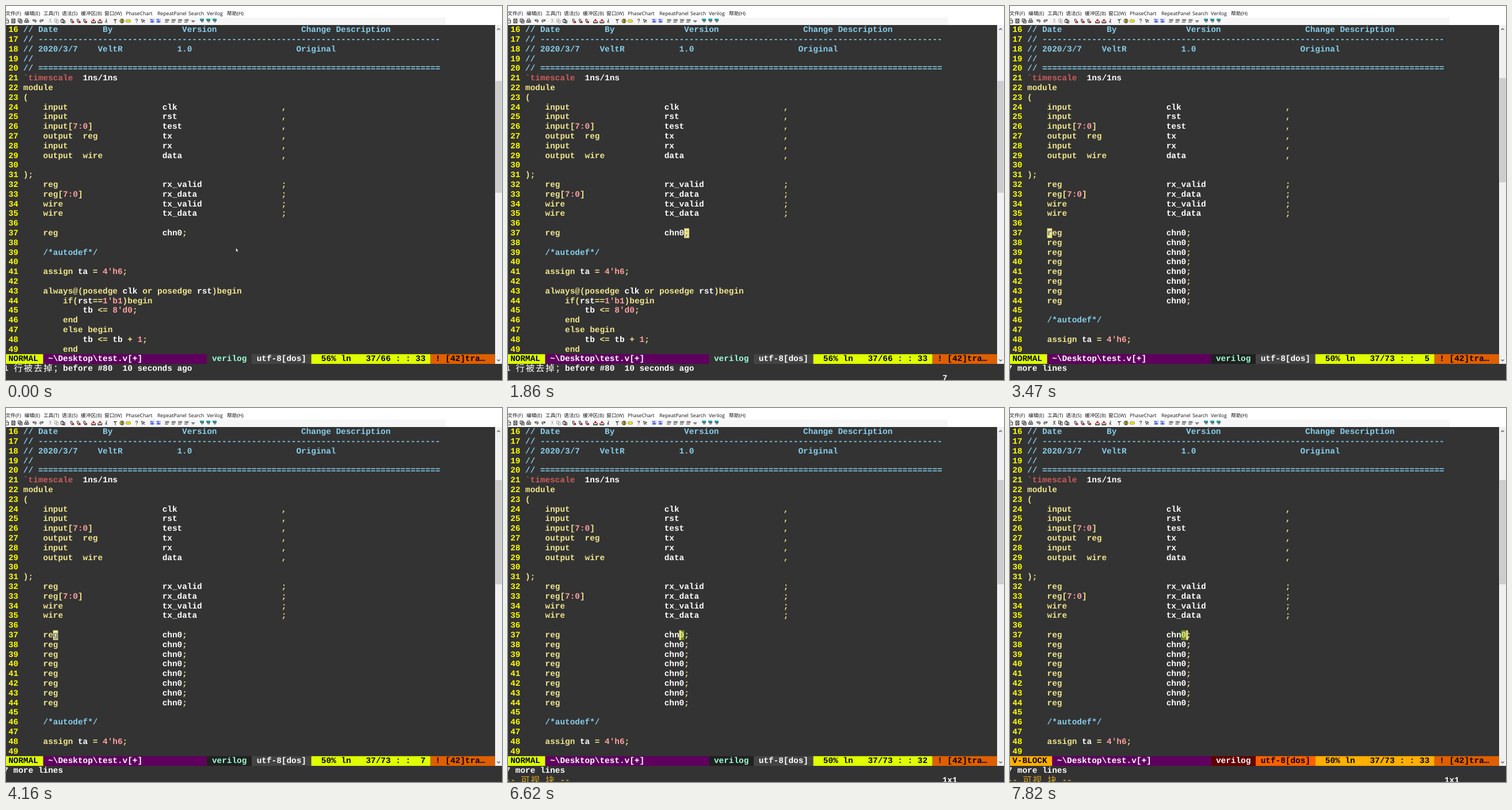
Write an HTML page that moves like this. It is 862 px wide and 649 px high and loops after 8 s.

```html
<!DOCTYPE html>
<html lang="zh-CN">
<head>
<meta charset="utf-8">
<title>Verilog editor</title>
<style>
html, body { margin: 0; width: 100%; height: 100%; overflow: hidden; background: #333; }
svg { display: block; }
text { white-space: pre; text-rendering: geometricPrecision; }
.code { font: bold 14.38px "Liberation Mono", monospace; }
.han { font: 15.5px "Noto Sans CJK SC", "Noto Sans CJK", sans-serif; }
.menu { font: 8.7px "Open Sans", "Noto Sans CJK SC", "Noto Sans CJK", sans-serif; }
.icon { fill: none; stroke-width: 1; }
</style>
</head>
<body>
<svg id="stage" width="862" height="649" viewBox="0 0 862 649"></svg>
<script>
const stage = document.getElementById('stage');
const sheet = document.styleSheets[0];
const W = 8.63, H = 16.8, LOOP = 8000;
const X = col => -4.5 + col * W;
const Y = row => 33 + row * H;
const C = {
  bg: '#333333', text: '#ffffff', comment: '#87ceeb', keyword: '#f0e68c',
  number: '#ffa0a0', macro: '#cd5c5c', line: '#ffff00', slate: '#708090',
  select: '#6b8e23', mode: '#daa520'
};

function add(tag, attrs, parent = stage, text) {
  const el = document.createElementNS('http://www.w3.org/2000/svg', tag);
  for (const key in attrs) el.setAttribute(key, attrs[key]);
  if (text !== undefined) el.textContent = text;
  return parent.appendChild(el);
}
const group = () => add('g', {});
const rect = (x, y, width, height, fill, parent) =>
  add('rect', { x, y, width, height, fill }, parent);
const cells = (col, row, n, fill, parent) => rect(X(col), Y(row), n * W, H, fill, parent);
const put = (col, row, str, fill, parent) =>
  add('text', { class: 'code', x: X(col), y: Y(row) + 12.2, fill }, parent, str);
const han = (col, row, str, fill, parent) =>
  add('text', {
    class: 'han', x: [...str].map((_, i) => X(col + 2 * i) + .8).join(' '),
    y: Y(row) + 13.4, fill
  }, parent, str);

// Visible from the first time, hidden at the second, and so on (ms).
let count = 0;
function show(el, ...times) {
  const name = 'show' + count++;
  const steps = times.map((t, i) => `${t / LOOP * 100}% { opacity: ${1 - i % 2} }`);
  if (times[0] > 0) steps.unshift('0% { opacity: 0 }');
  sheet.insertRule(`@keyframes ${name} { ${steps.join(' ')} }`, sheet.cssRules.length);
  el.style.animation = `${name} ${LOOP}ms step-end infinite`;
  return el;
}

// Verilog highlighting
const TOKEN = /\/\/.*|\/\*.*?\*\/|`\w+|\d+ns\/\d+ns|\d+'[hbd]\w+|\d+(:\d+)?|[a-z]\w*|[^\s\w]+/g;
const KEYWORD = /^(module|input|output|reg|wire|assign|always|posedge|or|if|else|begin|end)$/;
function colour(token) {
  if (/^\/[*/]/.test(token)) return C.comment;
  if (token[0] === '`') return C.macro;
  if (/ns$/.test(token)) return C.text;
  if (/^\d/.test(token)) return C.number;
  return KEYWORD.test(token) || /^\W/.test(token) ? C.keyword : C.text;
}
function code(lines, row, parent) {
  lines.forEach((line, i) => {
    for (const m of line.matchAll(TOKEN)) put(4 + m.index, row + i, m[0], colour(m[0]), parent);
  });
}
const at = (...parts) => {
  let s = '';
  for (let i = 0; i < parts.length; i += 2) s = s.padEnd(parts[i]) + parts[i + 1];
  return s;
};
const SLASHES = '/'.repeat(2);
const note = (...parts) => at(0, SLASHES, ...parts);
const decl = (type, name, end) => at(4, type, 28, name, 52, end);
const chn = '    reg'.padEnd(28) + 'chn0;';

// Menu and tool bar
rect(0, 0, 862, 33, '#ffffff');
rect(0, 20, 764, 13, '#f6f6f6');
[[-1, '文件(F)'], [32, '编辑(E)'], [65, '工具(T)'], [97, '语法(S)'], [130, '缓冲区(B)'],
 [171, '窗口(W)'], [208, 'PhaseChart'], [263, 'RepeatPanel'], [317, 'Search'],
 [349, 'Verilog'], [384, '帮助(H)']]
  .forEach(([x, s]) => add('text', { class: 'menu', x, y: 15.5, fill: '#111' }, stage, s));

const SHAPE = {
  page: 'M1.5 .5h3l2 2v5h-5zM2 3.5h4',
  disk: 'M.5 .5h6v7h-6zM2 .5v3h3v-3M2 7v-2h3v2',
  disks: 'M.5 .5h5v5h-5zM2.5 2.5h5v5h-5zM4 5h2',
  print: 'M.5 3.5h7v3h-7zM2 3V.5h4V3M2 5h4',
  undo: 'M1.5 4a2.5 2.5 0 1 1 2.5 2.5M1 1v3h3M3 4h3',
  redo: 'M6.5 4A2.5 2.5 0 1 0 4 6.5M7 1v3H4M2 4h3',
  cut: 'M2.5 0l2 5M5.5 0l-2 5M1.5 6h2M4.5 6h2',
  copy: 'M.5 .5h4v5h-4zM3 2.5h4v5H3z',
  paste: 'M.5 1.5h5v5h-5zM2 .5h2M3.5 3.5h4v4h-4z',
  find: 'M1 1h3v2l3 3v1H3zM1 4l3 3',
  load: 'M.5 4v3.5h7V4M1 6h6',
  run: 'M3 .5a1.5 1.5 0 1 1 0 3l2 4M2 7l2-4',
  tool: 'M1 1.5h6M4 1v7M3 2v2',
  help: 'M2.5 2.5V1h3v2L4 4.5v1M4 6.5v1',
  seek: 'M1 1l2 6 1-3 3-1zM4 4l3 3',
  list: 'M.5 1.5h7M.5 3.5h7M1 5v2M3 5v2M5 5v2',
  rule: 'M1 3.5h6M2 5.5h4',
  jump: 'M1 1.5h2M4 1v6M1 5.5h6'
};
const icon = (x, name, stroke = '#333') =>
  add('path', { class: 'icon', d: SHAPE[name], stroke, transform: `translate(${x - 4} 22)` });
const icons = (names, x) => names.split(' ').forEach((n, i) => icon(x + i * 11.3, n));

icons('page disk disks print', 2);
icons('undo redo', 50);
[[77, 'cut'], [88, 'copy']].forEach(([x, n]) => {
  show(icon(x, n, '#aaa'), 0, 6670);
  show(icon(x, n), 6670, LOOP);
});
show(icon(99, 'paste'), 0, 710, 900, LOOP);
show(icon(99, 'paste', '#aaa'), 710, 900);
icons('find find find', 115);
[115, 126.3, 137.6].forEach(x => rect(x, 26, 3, 3, '#d02020'));
icons('load load run', 152);
[152, 163.3].forEach(x => add('path', { d: `M${x - 3} 26l3-4 3 4z`, fill: '#d02020' }));
icon(190, 'tool');
add('ellipse', { cx: 201.5, cy: 26, rx: 3.5, ry: 3.5, fill: '#d8c820', stroke: '#444' });
rect(201, 23, 1.5, 6, '#333');
add('rect', { x: 208.5, y: 24, width: 8, height: 4, rx: 1.5, fill: '#f4ec30', stroke: '#8a8420' });
icons('help seek', 227);
[254, 265].forEach(x => { rect(x - 4, 22, 8, 7, '#b8c4ff'); icon(x, 'jump', '#2030b0'); });
icons('list list list list rule', 280);
[341, 352, 363].forEach(x => { rect(x - 4, 22, 7, 3, '#20a0a8'); icon(x, 'rule'); });

// Text area
rect(0, 33, 862, 616, C.bg);
for (let i = 0; i < 34; i++) put(1, i, String(16 + i), C.line);
code([
  note(3, 'Date', 16, 'By', 32, 'Version', 56, 'Change Description'),
  note(3, '-'.repeat(81)),
  note(3, '2020/3/7', 15, 'VeltR', 31, '1.0', 55, 'Original'),
  note(),
  note(3, '='.repeat(81)),
  '`timescale  1ns/1ns',
  'module',
  '(',
  decl('input', 'clk', ','),
  decl('input', 'rst', ','),
  decl('input[7:0]', 'test', ','),
  decl('output  reg', 'tx', ','),
  decl('input', 'rx', ','),
  decl('output  wire', 'data', ','),
  '',
  ');',
  decl('reg', 'rx_valid', ';'),
  decl('reg[7:0]', 'rx_data', ';'),
  decl('wire', 'tx_valid', ';'),
  decl('wire', 'tx_data', ';'),
  '',
  chn
], 0);

const before = show(group(), 0, 2290);
const after = show(group(), 2290, LOOP);
const tail = ['', '    /*autodef*/', '', "    assign ta = 4'h6;", ''];
code([
  ...tail,
  '    always@(posedge clk or posedge rst)begin',
  "        if(rst==1'b1)begin",
  "            tb <= 8'd0;",
  '        end',
  '        else begin',
  '            tb <= tb + 1;',
  '        end'
], 22, before);
code([...Array(7).fill(chn), ...tail], 22, after);

// Scroll bar
rect(850, 33, 12, 588, '#f0f0f0');
rect(850.5, 130, 11, 194, '#cdcdcd', before);
rect(850.5, 125, 11, 181, '#cdcdcd', after);
stage.append(before, after);
['M853.5 41.5l2.5-2.5 2.5 2.5', 'M853.5 613.5l2.5 2.5 2.5-2.5'].forEach(d =>
  add('path', { d, fill: 'none', stroke: '#505050', 'stroke-width': 1.2 }));

// Status line
function status(mode, main, type, typeText, enc, encText) {
  const g = group(), n = mode.length + 2;
  cells(0, 34, 41, '#5f005f', g);
  cells(0, 34, n, main, g);
  cells(41, 34, 9, type, g);
  cells(50, 34, 12, enc, g);
  cells(62, 34, 24, main, g);
  put(1, 34, mode, '#000', g);
  put(n + 1, 34, '~\\Desktop\\test.v[+]', '#fff', g);
  put(42, 34, 'verilog', typeText, g);
  put(51, 34, 'utf-8[dos]', encText, g);
  put(68, 34, 'ln', '#000', g);
  put(79, 34, ': :', '#000', g);
  return g;
}
show(status('NORMAL', '#dfff00', C.bg, '#9cffd3', '#444444', '#fff'), 0, 2290);
show(status('NORMAL', '#dfff00', '#202020', '#9cffd3', '#444444', '#fff'), 2290, 6670);
show(status('V-BLOCK', '#ffaf00', '#5f0000', '#fff', '#ff5f00', '#000'), 6670, LOOP);
cells(86, 34, 13, '#df5f00');
put(87, 34, '! [42]tra…', '#000');

const info = (col, str, ...times) => show(put(col, 34, str, '#000'), ...times);
info(64, '56%', 0, 2290);
info(64, '52%', 2290, 3470);
info(64, '50%', 3470, LOOP);
info(73, '37/66', 0, 2290);
info(73, '38/73', 2290, 3470);
info(73, '37/73', 3470, LOOP);
info(83, '33', 0, 2290, 7820, LOOP);
info(84, '5', 2290, 4160);
info(84, '7', 4160, 4680);
info(83, '32', 4680, 7820);

// Messages
han(2, 35, '行被去掉；', C.text, before);
put(0, 35, '1', C.text, before);
put(12, 35, 'before #80  10 seconds ago', C.text, before);
put(0, 35, '7 more lines', C.text, after);
show(put(88, 36, 'y', C.text), 710, 900);
show(put(88, 36, '7', C.text), 1860, 2290);
const visual = show(group(), 6620, LOOP);
put(0, 36, '--', C.mode, visual);
han(3, 36, '可视', C.mode, visual);
han(8, 36, '块', C.mode, visual);
put(11, 36, '--', C.mode, visual);
put(88, 36, '1x1', C.text, visual);

// Cursors
function cursor(col, row, char, ...times) {
  const g = show(group(), ...times);
  cells(col, row, 1, C.keyword, g);
  put(col, row, char, C.slate, g);
}
cursor(36, 21, ';', 150, 530, 900, 1560, 1800, 2290);
show(rect(X(36), Y(21) + H / 2, W, H / 2, C.keyword), 710, 900);
cursor(8, 22, 'r', 2290, 3040, 3240, 3470);
cursor(8, 21, 'r', 3470, 4160);
cursor(10, 21, 'g', 4160, 4680);
cursor(35, 21, '0', 4680, 5330, 5570, 5970, 6240, 6620);

cells(35, 21, 1, C.select, visual);
put(35, 21, '0', C.keyword, visual);
stage.append(visual);
const caret = (col, ...times) => show(rect(X(col), Y(21), 3, H, C.keyword), ...times);
caret(35, 6620, 7330, 7600, 7820);
caret(36, 7820, LOOP);

// Mouse pointer
show(add('path', {
  d: 'M399.5 419.5v7l1.5-1.3 1.2 2.6 1-.5-1.1-2.4h1.9z',
  fill: '#fff', stroke: '#111', 'stroke-width': .5
}), 0, 710);
</script>
</body>
</html>
```
